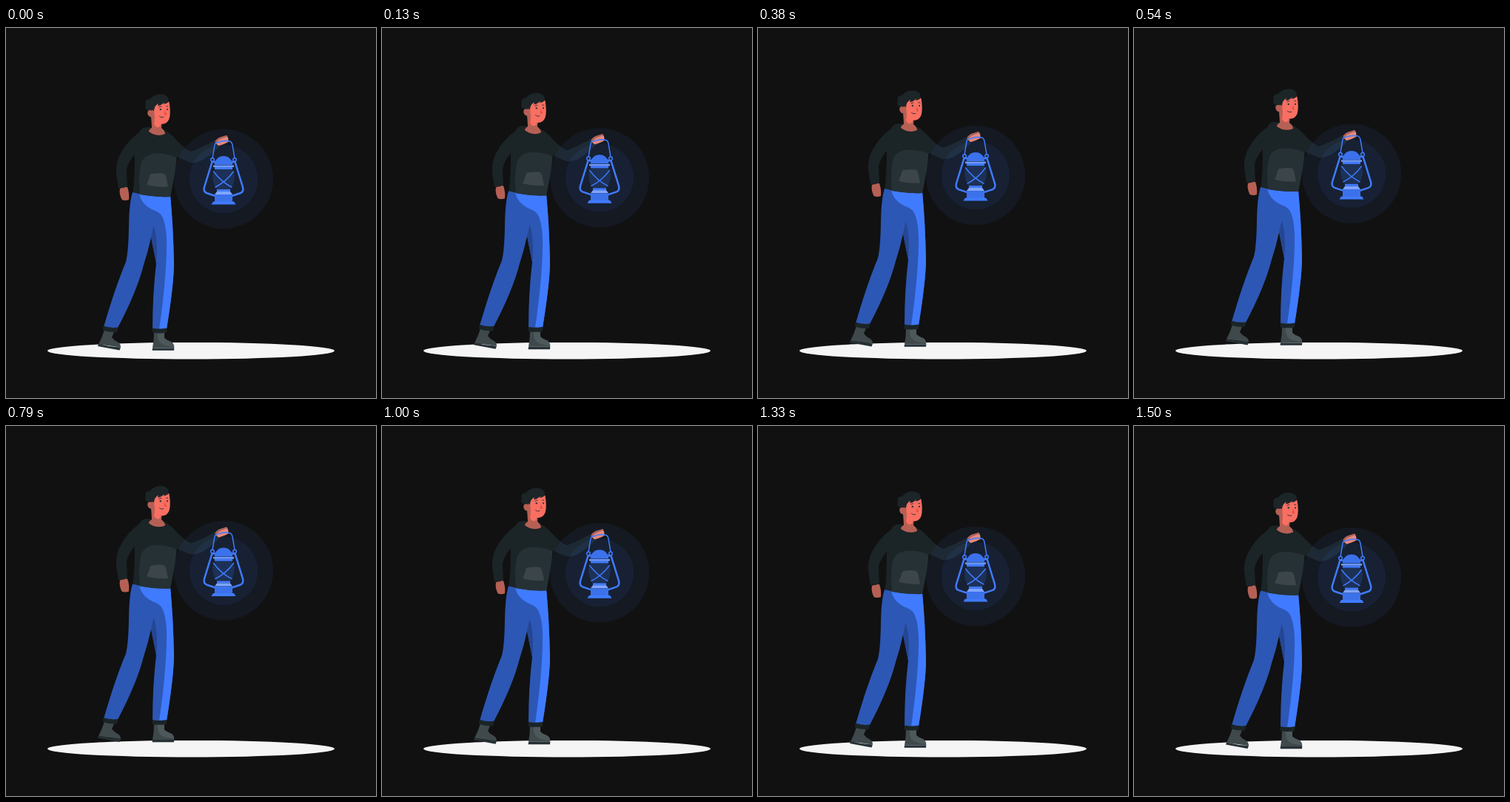
An HTML page that plays this animation: 500x500 px, repeating every 1.54 s.

```html
<!DOCTYPE html>
<html lang="en">
<head>
<meta charset="utf-8">
<title>Walking with a lantern</title>
<style>
  html, body { margin: 0; width: 100%; height: 100%; overflow: hidden; background: #111; }
  svg { display: block; width: 100vw; height: 100vh; }
  .blue { fill: #407bff; }
  .wire { fill: none; stroke: #407bff; stroke-linecap: round; stroke-linejoin: round; }
  .cloth { fill: #1b2427; }
  .panel { fill: #263136; }
  .line { fill: none; stroke: #263238; stroke-linecap: round; }
  .shade { fill: #b66055; }
  .shoe { fill: #3f494c; }
</style>
</head>
<body>
<svg viewBox="0 0 500 500">
  <ellipse cx="250" cy="436.2" rx="194" ry="11.3" fill="#f5f5f5"/>
  <g id="walker">
    <g id="shoes">
      <path class="shoe" d="M133 408L146 410.500Q144 416 143 418Q146 422 151 424.500Q155 426.500 155 431.500L125 427.500Q130 418 133 408Z"/>
      <path class="panel" d="M125 427Q140 431 155 431.500L153.500 435.500L124 430Z"/>
      <path class="shoe" d="M200 411H214L214 419Q217 422 223 424Q227 426 227.300 432.500H198Q200 422 200 411Z"/>
      <path d="M205 411H214L214 419Q217 422 223 424Q227 426 227.300 431Q213 430 208 425Q204 419 205 411Z" fill="#4d585b"/>
      <path class="panel" d="M198 432.500H227.300L227 435.800H197.600Z"/>
    </g>
    <g id="trousers">
      <path d="M171 222Q166.500 236 166 268Q165.500 302 162 316Q147 352 132 404L150 407Q177 356 186 320Q192 302 196 283L203 318Q198 360 198 407H217Q227 345 227 318Q226 268 222 226Z" fill="#2d57b5"/>
      <path class="blue" d="M180 223L222 226Q226 268 227 318Q227 345 217 407H207Q216 345 217 300Q218 266 210 253Q206 248 197 245Q182 237 180 223Z"/>
      <path d="M199.500 267Q206 286 203 318L196 283Z" fill="#254692"/>
      <path class="cloth" d="M131.500 402.500Q141 406 151 404.500L150 411Q139 411.500 131 408.500ZM197.500 405.500Q207 407.500 217.500 405.500L217 411.800Q207 413 197.800 411.800Z"/>
    </g>
    <path class="shade" d="M154 217Q158 214 164 215Q167 223 166 232Q161 234 156.500 232Q152.500 224 154 217Z"/>
    <g id="hoodie">
      <path class="cloth" d="M193 134Q183 133 180 141Q164 152 154 171Q148 183 149 197L152 216.500Q158 217 164 214L163 192Q165 181 174 171Q174 200 171.500 222Q195 229 222 228Q229 190 230.500 174L248 181.500Q256 184 268 177Q280 169 289 159L284 151Q262 163 250 167Q242 164 230 151Q222 142 214 138Z"/>
      <path class="panel" d="M181 225Q178 193 184 179Q190 169 206 169.500Q220 170 230.500 175Q229 195 222 228Q201 229 181 225Z"/>
      <path d="M195 197.500Q204 195.500 213 196.500Q216 198 217 204L219 214.500Q203 215.500 190 211.500Q193 206 195 197.500Z" fill="#3b454a"/>
    </g>
    <g id="head">
      <path class="shade" d="M196 117L197 135Q193 137 193 140Q204 148 215 143Q215 139 210 135L211 125Z"/>
      <path d="M199 103Q209 94 220.500 100Q223 115 220.500 123Q217 131 209 129.500Q209 135 204 134Q199 132 199 124Z" fill="#f96f62"/>
      <ellipse class="shade" cx="195" cy="115.500" rx="3.600" ry="4.800" transform="rotate(-20 195 115.500)"/>
      <path class="shade" d="M197 106L203 102Q199 112 201 120Q201 128 199 133L196 120Z"/>
      <path d="M192 112Q186 108 189 103Q186 97 195 96Q199 90 208 89.500Q219 89 220 98Q221 101 213 103L214 100.500Q209 105 205 105L206 102Q201 104 199.500 112Q196 109 192 112Z" fill="#1c2528"/>
      <path class="line" d="M206.500 107Q208 105.300 210 106M216.500 105.800Q218 105 219 106" stroke-width=".9"/>
      <circle cx="208.800" cy="110" r="1.200" fill="#263238"/>
      <circle cx="218" cy="110" r="1.100" fill="#263238"/>
      <path d="M214.500 111L217 117Q215.500 118 214 117.500" fill="#e04c48"/>
      <path class="line" d="M207.500 119.500Q210 122 213 120.500" stroke-width=".9"/>
    </g>
    <g id="glow" class="blue">
      <circle cx="294" cy="204" r="67.200" opacity=".07"/>
      <circle cx="294" cy="204" r="46.200" opacity=".08"/>
    </g>
    <g id="hand">
      <path d="M283 153Q286 148 292 147L298 145Q301 148 300.500 154Q295 157 288 159Q284 158 283 153Z" fill="#e3897f"/>
      <path d="M282.500 153Q286 148 292 147L298 145L299 147Q291 149 287 152Q285 154 284 157Z" fill="#ab6158"/>
    </g>
    <g id="lantern">
      <path d="M283 191H305L309 199Q309 211 303 218H285Q279 211 279 199Z" fill="#1d3157"/>
      <path class="wire" d="M279 176L282 158Q283 154 287 154.500Q293 151.500 302 153Q305 153.500 306 158L309 176" stroke-width="1.500"/>
      <circle class="wire" cx="279" cy="178" r="2.300" stroke-width="1.500"/>
      <circle class="wire" cx="309" cy="178" r="2.300" stroke-width="1.500"/>
      <path class="wire" d="M282 181H278.500L268 215Q266.500 221 271 223L283 227M306 181H309.500L320 215Q321.500 221 317 223L305 227" stroke-width="2.500"/>
      <path d="M282 185Q281 180 285 177Q288 173 294 173Q300 173 303 177Q307 180 306 185Z" fill="#3b71ea"/>
      <path class="blue" d="M282 188H306V191H282Z"/>
      <path d="M280 185.500H308V188H280Z" fill="#6f9aff"/>
      <path class="wire" d="M280.500 194Q291 208 305 215M307.500 194Q297 208 283 215" stroke-width="1.500"/>
      <path class="blue" d="M285 218H303V221H285Z"/>
      <path d="M285 221H303L306 225H282Z" fill="#80a5ff"/>
      <path d="M282 225H306V235H282Z" fill="#3b71ea"/>
      <path class="blue" d="M280 234.500H308L310.500 238.500H277.500Z"/>
    </g>
  </g>
</svg>
<script>
  const LOOP = 1540, STEPS = 37;
  // Straight up and down drift: [time in ms, vertical offset]
  const drift = [[0, 0], [722, -9.5], [1473, 0.88], [LOOP, 0]];
  const walker = document.getElementById("walker");
  const start = performance.now();

  function offsetAt(t) {
    const i = drift.findIndex(([end]) => t < end);
    const [t0, y0] = drift[i - 1], [t1, y1] = drift[i];
    return y0 + (y1 - y0) * (t - t0) / (t1 - t0);
  }

  function draw(now) {
    const t = Math.max(0, now - start) % LOOP;
    const step = Math.min(STEPS - 1, Math.floor(t * STEPS / LOOP + 0.1));
    walker.setAttribute("transform", `translate(0 ${offsetAt(step * LOOP / STEPS).toFixed(2)})`);
    requestAnimationFrame(draw);
  }
  draw(start);
</script>
</body>
</html>
```
